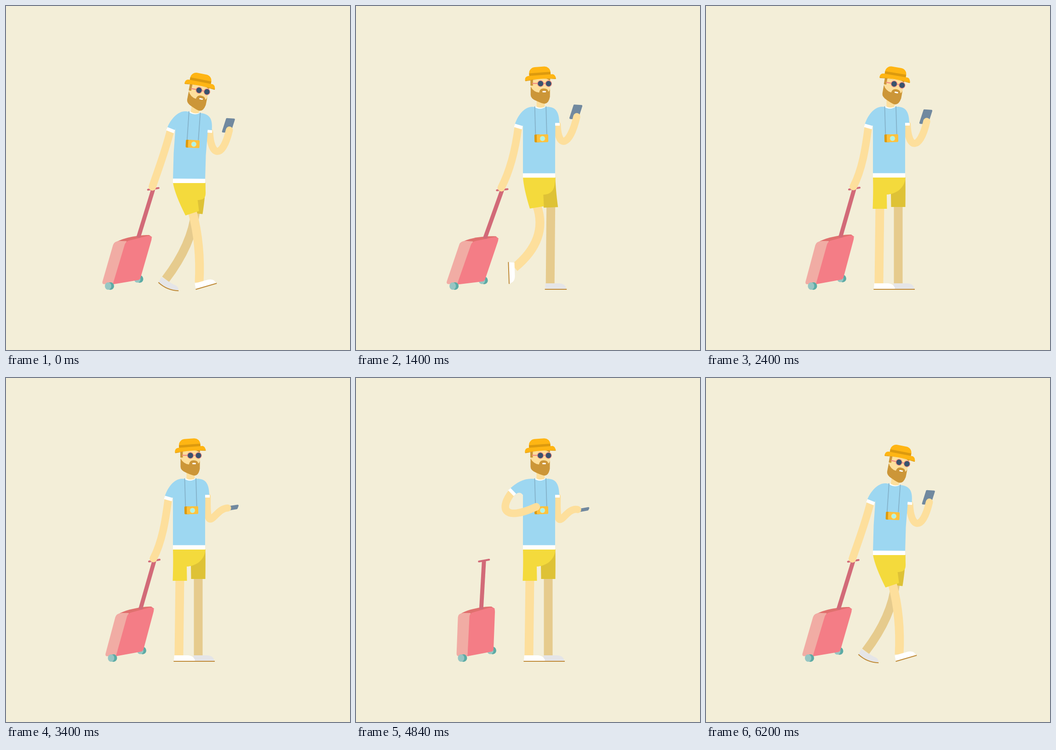
An HTML page with a canvas that plays this animation: 748 by 748 pixels, repeating every 6.24 s.

```html
<!DOCTYPE html>
<html>
<head>
<meta charset="utf-8">
<title>Traveller</title>
<style>
html, body { margin: 0; width: 100%; height: 100%; overflow: hidden; background: #f3eed8; }
canvas { display: block; }
</style>
</head>
<body>
<canvas id="stage" width="748" height="748"></canvas>
<script>
const ctx = document.getElementById('stage').getContext('2d');
const LOOP = 6240, STEP = 960, TICK = 40;
const { PI, sin, cos, abs, max, min } = Math;
const DEG = PI / 180;
const BACK = '#f3eed8', SKIN = '#fddf9c', SHIRT = '#9dd7f1', BEARD = '#cc9638';
const ORANGE = '#ffb513', OCHRE = '#dc9a0e', PINK = '#f18a80', POLE = '#d26a78';

const clamp = v => max(0, min(1, v));
const ramp = (t, from, to) => (1 - cos(PI * clamp((t - from) / (to - from)))) / 2;
const pulse = (t, a, b, c, d) => ramp(t, a, b) - ramp(t, c, d);
const mix = (a, b, k) => a.map((v, i) => v + (b[i] - v) * k);
const add = (a, b, k = 1) => a.map((v, i) => v + b[i] * k);
const same = (x, y) => [x, y];

// Each segment: 2 numbers = line, 4 = quadratic, 6 = cubic
function trace(map, segs) {
  ctx.beginPath();
  segs.forEach((s, n) => {
    const p = [];
    for (let i = 0; i < s.length; i += 2) p.push(...map(s[i], s[i + 1]));
    if (!n) ctx.moveTo(...p);
    else if (p.length === 2) ctx.lineTo(...p);
    else if (p.length === 4) ctx.quadraticCurveTo(...p);
    else ctx.bezierCurveTo(...p);
  });
}
function fill(color, map, ...segs) {
  trace(map, segs);
  ctx.fillStyle = color;
  ctx.fill();
}
function line(color, width, cap, map, ...segs) {
  trace(map, segs);
  ctx.strokeStyle = color;
  ctx.lineWidth = width;
  ctx.lineCap = cap;
  ctx.stroke();
}
function oval(color, x, y, rx, ry = rx) {
  ctx.beginPath();
  ctx.ellipse(x, y, rx, ry, 0, 0, 2 * PI);
  ctx.fillStyle = color;
  ctx.fill();
}
function box(color, x, y, w, h, r = 0) {
  ctx.beginPath();
  ctx.roundRect(x, y, w, h, r);
  ctx.fillStyle = color;
  ctx.fill();
}
function turned(x, y, deg, draw) {
  ctx.save();
  ctx.translate(x, y);
  ctx.rotate(deg * DEG);
  draw();
  ctx.restore();
}

// phase 0 = heel strike, 0.5 = push off; go fades from standing (0) to walking (1)
function drawLeg(phase, go, far, drop) {
  const p = phase - Math.floor(phase), a = 2 * PI * p;
  const late = clamp((p - .3) / .7);
  const swing = go * sin(PI * late ** 1.42);
  const lift = go * 38 * sin(PI * late * late);
  const strike = go * clamp(1 - min(p, 1 - p) / .1);
  const thigh = go * (16.5 * cos(a) - 7 * sin(a));

  const ax = 376 + (far ? 42 : 0) + go * (57.5 * (abs(4 * p - 2) - 1) + 13 * sin(a) - 13.5);
  const ay = 603 - lift - 2.5 * strike;
  const foot = 88 * swing * abs(swing) - 16 * strike;
  const hx = 378 + (far ? 40 : 0) + 10.5 * go + thigh;
  const hy = 441 - (far ? 4 : 0) - .15 * thigh - .07 * lift;
  const kx = (hx + ax) / 2 + 50 * swing + 12 * strike, ky = (hy + ay) / 2 + 5 * swing;
  const hem = (-.75 * thigh - 6 * go) * DEG;
  const left = [hx - 15.5 * cos(hem), hy - 15.5 * sin(hem)];
  const right = [hx + 15.5 * cos(hem), hy + 15.5 * sin(hem)];
  const hip = (x, y) => [x, y + drop];

  line(far ? '#e6cb8d' : SKIN, 19, 'butt', same, [hx, hy + drop - 4], [kx, ky, ax, ay + 1]);
  turned(ax, ay, foot, () => {
    const bend = 9 * sin(PI * clamp(foot / 45));
    fill(far ? '#e5e5e7' : '#fff', same, [-10, 0], [20, bend * .5], [33, 1 + bend * .3, 35, 12],
      [12, 12 + bend, -11, 12]);
    line('#bf8a38', 2, 'butt', same, [-11.5, 13], [12, 13 + bend, 36, 13]);
  });

  if (far) {
    fill('#dec236', hip, [433.5, 373], [434, 398, ...right], left, [402, 405], [390, 373]);
  } else {
    const inner = hx + 15;
    fill('#f4da3c', hip, [363, 372], [364 + max(0, thigh) * .2, 398, ...left], right,
      [inner - thigh * .2, 410], [inner + 20, 409, 433, 396, 433.5, 372]);
  }
}

// Returns where the handle is
function drawCase(dx, tilt) {
  const sag = max(0, tilt - .273);
  const S = (x, y) => [x + dx + tilt * (590 - y), y + (x - 232) * sag];
  const wheel = (x, y) => {
    oval('#5caba5', x + 2, y, 8, 8.3);
    oval('#97c6c3', x - 3, y, 7, 8);
  };
  wheel(295 + dx, 592.5 + 64 * sag);
  fill('#e0706e', S, [226, 512], [240, 503, 270, 497, 291, 497], [299, 502], [246, 516]);
  line(POLE, 8.8, 'butt', S, [269, 503], [271, 398]);
  line(POLE, 4, 'round', S, [260, 399], [282, 395]);
  fill('#f1aca4', S, [246, 511], [245, 605], [223, 605], [219, 604, 219, 599], [219, 520],
    [219, 512, 230, 511]);
  fill('#f47d86', S, [252, 509.5], [288, 499], [299, 497, 299, 508], [299, 590], [299, 594, 295, 595],
    [243, 605], [244, 518], [245, 511, 252, 509.5]);
  wheel(231.5 + dx, 609);
  return S(271, 397);
}

function drawHat() {
  fill(OCHRE, same, [367, 159], [434.5, 159], [434, 161], [400, 157, 368, 161]);
  box(ORANGE, 377, 132, 46.5, 22, [13, 13, 0, 0]);
  box(OCHRE, 377, 144.5, 46.5, 6);
  fill(ORANGE, same, [374, 150], [428, 150], [433, 151, 434.5, 159.5], [401, 157, 367, 159.5],
    [367, 151, 374, 150]);
}

function drawHead() {
  fill(SKIN, same, [380, 156], [422, 156], [421.5, 192], [400, 203], [380, 185]);
  box(BEARD, 379, 157, 5.5, 16);
  fill(BEARD, same, [413, 157], [422, 157], [421.5, 162]);
  fill(BEARD, same, [379.5, 175], [386, 187, 398, 188], [399, 179, 408, 179], [417, 179, 418, 186],
    [421, 184, 421.5, 180], [421.5, 197], [419, 211, 411, 212], [407, 213, 392, 206], [379.5, 201, 379.5, 193]);
  box('#fff', 405, 184.5, 8, 3, 1.5);
  box(PINK, 383, 167, 37, 2.2);
  for (const x of [401, 418.5]) {
    oval(PINK, x, 168.5, 7.2);
    oval('#38536e', x, 168.5, 5.9);
  }
}

function drawCamera() {
  box(OCHRE, -15, -8.5, 12, 17, 2);
  box('#fdc23e', -10, -8.5, 25, 17, 2);
  oval('#fbd878', 2.5, .5, 6);
  oval('#aff4e8', 2.5, .5, 5);
}

function drawPhoneArm(shoulder, palm, flat) {
  const center = add(palm, mix([-2, -10], [14, 0], flat));
  const across = mix([7.7, .5], [8.5, -1.5], flat), along = mix([-4.4, 13.7], [-.8, 1.8], flat);
  const corners = [[-1, -1], [1, -1], [1, 1], [-1, 1], [-1, -1], [1, -1]]
    .map(([i, j]) => add(add(center, across, i), along, j));
  ctx.lineJoin = 'round';
  line('#71899f', 4, 'round', same, ...corners);
  fill('#71899f', same, ...corners);
  line(SKIN, 15.5, 'round', same, shoulder, [
    ...add(shoulder, mix([2, 54], [-2, 97], flat)),
    ...add(palm, mix([-15, 64], [-30, -7], flat)), ...palm]);
}

// Pose: cuff x, y and angle, two arm handles, hand
function drawCaseArm([cx, cy, deg, ux, uy, vx, vy, ...hand], P) {
  const cuff = P(cx, cy), dir = [cos(deg * DEG), sin(deg * DEG)], across = [-dir[1], dir[0]];
  const outer = add([cx, cy], across, 8.7), inner = add([cx, cy], across, -8.7);
  line(SKIN, 16.5, 'round', same, cuff, [...add(cuff, [ux, uy]), ...add(hand, [vx, vy]), ...hand]);
  fill(SHIRT, P, [384, 219], [366, 218, ...add(outer, dir, -22), ...outer], inner,
    [...add(inner, dir, -14), 363.5, 255], [380, 258]);
  line('#fff', 7.5, 'butt', P, outer, inner);
}

function draw(t) {
  // Walks away from a contact, later back into the same contact
  const clock = t < 4000 ? min(t, 2400) : max(-STEP / 2, min(0, t - 6200));
  const go = 1 - pulse(t, 1920, 2400, 5680, 6200);
  const beat = cos(2 * PI * clock / STEP);
  const drop = 6 + 6 * beat;
  const reach = -13.5 * pulse(t, 5120, 5420, 5540, 5860);
  const lean = drop * .79 + reach;
  const nod = drop * .92 + 10 * pulse(t, 1920, 2400, 2680, 3160) + reach * .3;
  const flat = pulse(t, 3000, 3500, 5440, 5860);

  // Bends the upper body over the hips
  const P = (x, y) => {
    const u = max(0, (373 - y) / 155);
    return [x + lean * u * u, y + (x - 398) * lean / 155 * 2 * u + drop];
  };

  ctx.fillStyle = BACK;
  ctx.fillRect(0, 0, 748, 748);

  // Once let go, the suitcase rocks until it stands still
  const free = max(0, t - 3940);
  const rock = Math.exp(-free / 560) * cos(PI * free / 400);
  const held = rock + (1 - rock) * ramp(t, 5580, 5860);
  const handle = drawCase(go * (6 * beat - 12.5), .267 * held + go * (.047 - .025 * beat));

  const rest = 251 - 11 * go;
  drawPhoneArm(P(437.5, 258),
    [480 + 2 * flat + lean * .6, rest + (286 - rest) * flat + drop * 1.7 + lean], flat);

  const phase = clock / (2 * STEP);
  drawLeg(phase + .5, go, true, drop);
  drawLeg(phase, go, false, drop);

  fill(SHIRT, P, [363, 366], [363, 310], [363, 255], [363, 220, 386, 219], [412, 219],
    [431, 218, 442, 225, 442, 256], [433.5, 256], [433, 310], [433, 366]);
  fill('#fff', P, [363, 363.5], [433, 363.5], [433, 373], [363, 373]);
  line('#fff', 6, 'butt', P, [433, 257], [443, 257]);
  fill('#fff', P, [386.5, 218.5], [400, 228, 413, 218.5]);
  fill(SKIN, P, [392.5, 198], [392.5, 219], [401, 223, 410, 219], [410, 198]);

  const [neckX, neckY] = P(400, 215);
  turned(neckX, neckY + drop * .12, nod, () => {
    ctx.translate(-400, -215);
    drawHead();
    turned(400, 158, -4.5 * (1 - nod / 11), () => {
      ctx.translate(-400, -158);
      drawHat();
    });
  });

  const cam = P(403, 287.5), camDeg = -1.5 + lean * .42;
  const up = [8 * sin(camDeg * DEG), -8 * cos(camDeg * DEG)];
  for (const side of [-12.5, 12])
    line('#84b2ca', 1.8, 'butt', same, P(401 + side, 218), add([cam[0] + side, cam[1]], up));
  turned(...cam, camDeg, drawCamera);

  // Hand goes from the handle to the camera, past the hip and back
  const bow = (12 - drop) / 2.5;
  const hang = [353, 262, 106, bow - 11, bow + 44, bow + 14, bow - 41, ...add(handle, [-2, -4.5])];
  const photo = [339.5, 248, 136, -28, 35, -72, 33, 392, 280];
  const hip = [348, 252, 118, -21, 37, -36, -35, 349, 345];
  const away = pulse(t, 3940, 4340, 5320, 5600);
  drawCaseArm(mix(hang, mix(photo, hip, ramp(t, 5100, 5360)), away), P);
}

const begin = performance.now();
requestAnimationFrame(function tick(now) {
  const t = max(0, now - begin) % LOOP;
  draw(t - t % TICK);
  requestAnimationFrame(tick);
});
</script>
</body>
</html>
```
